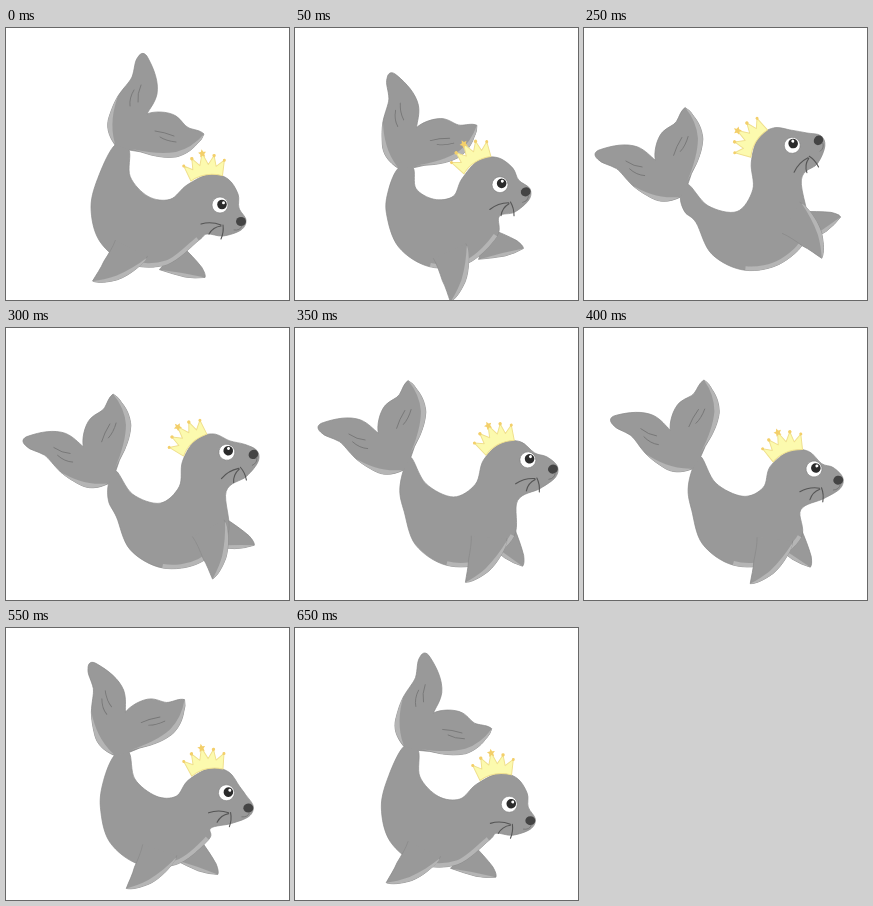
An HTML page for the animation above (700 ms loop, 283x272 px).

```html
<!DOCTYPE html>
<html lang="en">
<head>
<meta charset="utf-8">
<title>Seal with a crown</title>
<style>
  html, body { margin: 0; width: 100%; height: 100%; overflow: hidden; background: #fff; }
  svg { display: block; width: 100%; height: 100%; }
  .skin { fill: #999; stroke: #8a8a8a; stroke-width: .7; stroke-linejoin: round; }
  .shade { fill: #b5b5b5; }
  .line { fill: none; stroke: #777; stroke-width: .9; stroke-linecap: round; }
  .whisker { fill: none; stroke: #555; stroke-width: 1.1; stroke-linecap: round; }
  .gold { fill: #fcfaae; stroke: #f0e08e; stroke-width: 1; stroke-linejoin: round; }
  .tip { fill: #f3cf6a; }
</style>
</head>
<body>
<svg viewBox="0 0 283 272">
  <defs><clipPath id="skinClip"><path id="clipShape"/></clipPath></defs>

  <g id="far">
    <path class="skin" d="M-6 -8Q14 -6 26 -3Q34 0 35 3Q28 10 19 15Q8 20 -6 25"/>
    <path class="shade" d="M35 3Q28 10 19 15Q8 20 -4 24Q14 13 35 3Z"/>
  </g>

  <path id="body" class="skin"/>
  <g clip-path="url(#skinClip)">
    <path id="belly" fill="none" stroke="#b5b5b5" stroke-width="8"/>
  </g>

  <g id="tail">
    <path class="skin" d="M-3 1C-10 -9 -12 -18 -9 -27C-6 -36 -4 -41 0 -48C6 -57 11 -61 14 -67
      C17 -75 16 -82 20 -87C23 -92 27 -92 30 -86C36 -75 41 -62 39 -50C37 -41 32 -36 29 -30
      C35 -33 50 -33 58 -28C64 -24 66 -18 71 -16C76 -14 82 -14 86 -10Q84 -4 79 0
      C73 7 66 11 58 13C48 14 42 13 33 11Q22 7 11 6"/>
    <path class="shade" d="M86 -10Q84 -4 79 0C73 7 66 11 58 13C48 14 42 13 33 11Q22 7 14 5C32 9 46 10 58 8Q74 4 86 -10Z"/>
    <path class="shade" d="M-3 0C-10 -9 -12 -18 -9 -27C-6 -36 -4 -41 0 -48C-5 -34 -8 -18 -3 0Z"/>
    <path class="line" d="M12 -38Q11 -46 16 -54M20 -42Q19 -50 23 -59M37 -13Q46 -12 56 -8M42 -7Q48 -3 58 -2"/>
  </g>

  <g id="near">
    <path class="skin" d="M-10 -14C-4 -18 16 -19 28 -15C38 -11 46 -6 49 -1C42 2 35 4 28 8C20 11 12 14 6 18"/>
    <path class="shade" d="M-8 -15C-4 -18 16 -19 28 -15C38 -11 46 -6 49 -1C42 -5 36 -8 27 -11C15 -14 4 -15 -8 -15Z"/>
  </g>

  <g id="skull">
    <g transform="translate(-14.500 -28) rotate(-8)">
      <path class="gold" d="M-15 2L-20 -14L-11.500 -9L-11 -20L-4 -12L0 -24L4.500 -12L11.500 -20L12 -9L21 -14L17 1Q0 -6 -15 2Z"/>
      <g class="tip">
        <path d="M0 -28L1.200 -25.300L4 -25L2 -23L2.500 -20L0 -21.500L-2.500 -20L-2 -23L-4 -25L-1.200 -25.300Z"/>
        <circle cx="-20" cy="-14" r="1.500"/><circle cx="-11" cy="-20" r="1.700"/>
        <circle cx="11.500" cy="-20" r="1.700"/><circle cx="21" cy="-14" r="1.500"/>
      </g>
    </g>
  </g>

  <g id="face">
    <circle r="8" fill="#fff" stroke="#7d7d7d" stroke-width=".6"/>
    <circle cx="2" cy="-.5" r="4.800" fill="#2b2b2b"/>
    <circle cx="3.500" cy="-2.300" r="1.500" fill="#fff"/>
    <ellipse cx="21" cy="16.500" rx="5" ry="4.500" fill="#444"/>
    <path class="line" d="M22 21Q20 26 14 25"/>
    <path class="whisker" d="M1 20Q-9 16 -19 19M1 21Q-7 22 -11 29M3 20Q4 27 1 34"/>
  </g>
</svg>

<script>
const LOOP = 700, STEP = 50, RAD = Math.PI / 180;
const el = id => document.getElementById(id);

// tail, head: x, y, angle. hip: centre of the belly arc.
// near, far: flipper's place around the hip, and its own angle.
const low  = { time: 0,   tail: [112, 116, 0],   head: [214, 177, 0],   hip: [139, 180], near: [108, 143], far: [53, 38] };
const high = { time: 150, tail: [93, 183, -65],  head: [187, 116, -68], hip: [158, 184], near: [11, -9],   far: [-20, -32] };
const back = { time: 250, tail: [96, 166, -80],  head: [204, 123, -49], hip: [165, 184], near: [8, 56],    far: [7, -8] };
const turn = { time: 350, tail: [108, 139, -80], head: [226, 141, -18], hip: [163, 180], near: [45, 121],  far: [27, 62] };
const poses = [low, high, back, turn, { ...low, time: LOOP }];

const mix = (a, b, k) => a.map((v, i) => v + (b[i] - v) * k);
const smooth = k => k * k * (3 - 2 * k);
const easeOut = k => 1 - (1 - k) ** 2;

function polar([x, y], r, deg) {
  return [x + r * Math.cos(deg * RAD), y + r * Math.sin(deg * RAD)];
}

function place([bx, by, deg], x, y) {
  const c = Math.cos(deg * RAD), s = Math.sin(deg * RAD);
  return [bx + x * c - y * s, by + x * s + y * c];
}

// Midpoint of two points, pushed sideways.
function bulge(a, b, push) {
  const dx = b[0] - a[0], dy = b[1] - a[1], len = Math.hypot(dx, dy);
  return [(a[0] + b[0]) / 2 - dy / len * push, (a[1] + b[1]) / 2 + dx / len * push];
}

function poseAt(time) {
  const i = poses.findIndex(p => p.time > time);
  const a = poses[i - 1], b = poses[i];
  const k = (time - a.time) / (b.time - a.time);
  const settling = a === turn;
  const pose = {};
  for (const part of ["tail", "head", "hip", "near", "far"]) {
    const ease = !settling ? k : part === "head" ? easeOut(k) : smooth(k);
    pose[part] = mix(a[part], b[part], ease);
  }
  return pose;
}

// The face slides forward on the skull while the seal comes down.
function faceOf([x, y, deg], time) {
  const slide = 12 * Math.max(0, Math.sin(Math.PI * (time - high.time) / 500));
  return time < high.time ? [x, y, deg] : [x + .6 * slide, y - .8 * slide, deg];
}

function outlineOf({ tail, head, hip }, face) {
  const arc = [];
  for (let i = 0; i < 5; i++) {
    arc.push(polar(hip, 54 + i * 2.2, 181 + head[2] * .25 - i * 37.5));
  }
  const outer = place(tail, -3, 1), inner = place(tail, 11, 6);
  const nape = place(head, -33, -20);
  const dip = polar(hip, 12, -75 + head[2] * 2.1);
  return [
    outer, bulge(outer, arc[0], 4), ...arc,
    place(head, -13, 29), place(face, 3, 31), place(face, 21, 25),
    place(face, 26, 15), place(face, 19, 3),
    place(head, 18, -11), place(head, 8, -26), place(head, -10, -31),
    nape, bulge(dip, nape, 9), dip, bulge(inner, dip, 9), inner
  ];
}

const fix = p => p.map(v => v.toFixed(2)).join(" ");

function curve(pts, from = 0, count = pts.length) {
  const at = i => pts[(i + pts.length) % pts.length];
  let d = "M" + fix(at(from));
  for (let i = from; i < from + count; i++) {
    const [a, b, c, e] = [at(i - 1), at(i), at(i + 1), at(i + 2)];
    d += "C" + fix([b[0] + (c[0] - a[0]) / 6, b[1] + (c[1] - a[1]) / 6,
                    c[0] - (e[0] - b[0]) / 6, c[1] - (e[1] - b[1]) / 6, ...c]);
  }
  return d;
}

function move(id, [x, y, deg]) {
  el(id).setAttribute("transform", `translate(${x} ${y}) rotate(${deg})`);
}

function draw(time) {
  const pose = poseAt(time), { hip, near, far } = pose;
  const face = faceOf(pose.head, time);
  move("tail", pose.tail);
  move("skull", pose.head);
  move("face", face);
  move("near", [...polar(hip, 45, near[0]), near[1]]);
  move("far", [...polar(hip, 57, far[0]), far[1]]);

  const outline = outlineOf(pose, face);
  const shape = curve(outline) + "Z";
  el("body").setAttribute("d", shape);
  el("clipShape").setAttribute("d", shape);
  el("belly").setAttribute("d", curve(outline, 4, 2));
}

function tick() {
  draw(Math.floor(performance.now() % LOOP / STEP) * STEP);
  requestAnimationFrame(tick);
}
tick();
</script>
</body>
</html>
```
